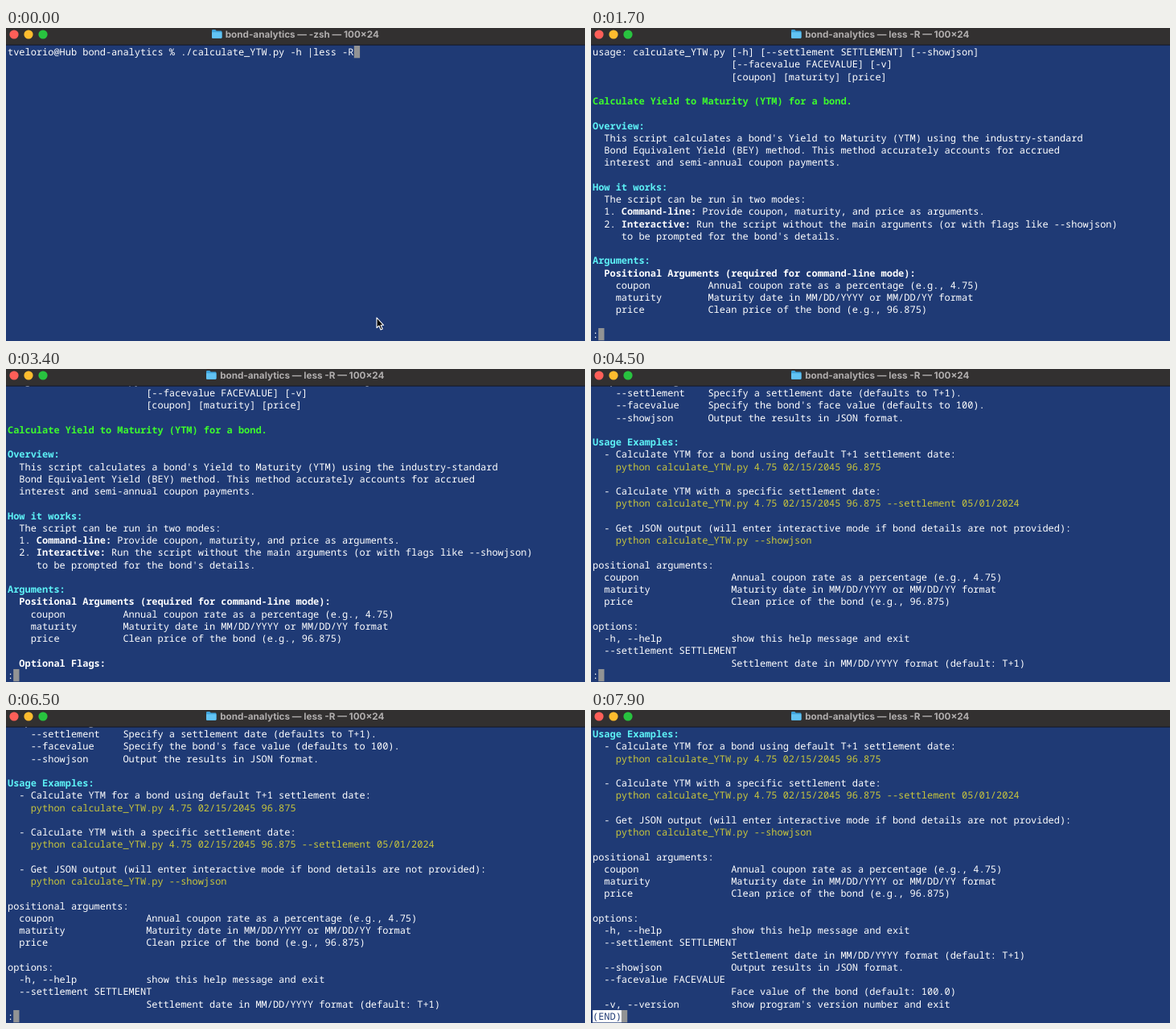
Animation of 720 by 389 pixels, one loop 8000 ms. Source, as an HTML page:

```html
<!DOCTYPE html>
<html lang="en">
<head>
<meta charset="utf-8">
<title>Terminal</title>
<style>
html, body { margin: 0; width: 100%; height: 100%; overflow: hidden; background: #1f3a75; }
svg { display: block; width: 100%; height: 100%; }
text { white-space: pre; text-rendering: geometricPrecision; }
.mono { font: 500 11.965px "Noto Sans Mono", "DejaVu Sans Mono", monospace; fill: #fff; }
.mono .b { font-weight: 700; }
.cyan { fill: #5df1f6; font-weight: 700; }
.green { fill: #3dfb2d; font-weight: 700; }
.yellow { fill: #c9c63c; }
#title { font: 700 11.7px Inter, "Open Sans", sans-serif; fill: #b1aeae; text-anchor: middle; }
</style>
</head>
<body>
<svg viewBox="0 0 720 389" preserveAspectRatio="none">
  <clipPath id="page"><rect y="21.5" width="720" height="351.5"/></clipPath>
  <rect width="720" height="389" fill="#1f3a75"/>
  <rect width="720" height="21" fill="#323030"/>
  <rect y="20.6" width="720" height="1" fill="#141722"/>
  <circle cx="10" cy="8" r="5.6" fill="#fe5f58"/>
  <circle cx="28" cy="8" r="5.6" fill="#febc2e"/>
  <circle cx="46" cy="8" r="5.6" fill="#28c33f"/>
  <g id="folder">
    <path d="M0 1.2Q0 0 1.2 0H4.2L5.8 1.5H11.3Q12.5 1.5 12.5 2.7V9.6Q12.5 10.8 11.3 10.8H1.2Q0 10.8 0 9.6Z" fill="#3fa4dc"/>
    <path d="M0 3.2H12.5V9.6Q12.5 10.8 11.3 10.8H1.2Q0 10.8 0 9.6Z" fill="#62c3f3"/>
  </g>
  <text id="title" x="368.3" y="12"></text>
  <g clip-path="url(#page)"><g id="doc" class="mono"></g></g>
  <text id="shell" class="mono" x="2" y="34"></text>
  <rect id="cursor" width="7.3" height="15.3" fill="#929394"/>
  <rect id="endBox" x="2" y="373" width="35.9" height="15.3" fill="#fff"/>
  <text id="status" class="mono" x="2" y="385"></text>
  <path id="pointer" d="M461 360V372.6L463.9 370L466 375L468.2 374L466.1 369.3H469.6Z" fill="#000" stroke="#fff" stroke-width="1.1" stroke-linejoin="round"/>
</svg>
<script>
const LOOP = 8000, TOP = 22, PITCH = 15.26, CELL = 7.18, LAST_ROW = 23;
const $ = id => document.getElementById(id);

const opt = (indent, col, name, info) => (" ".repeat(indent) + name).padEnd(col) + info;
const arg = (name, info) => opt(4, 20, name, info);
const item = (name, info) => opt(2, 24, name, info);
const params = row => [
  row("coupon", "Annual coupon rate as a percentage (e.g., 4.75)"),
  row("maturity", "Maturity date in MM/DD/YYYY or MM/DD/YY format"),
  row("price", "Clean price of the bond (e.g., 96.875)")
];

// Leading # ! $ sets a line colour; *text* is bold.
const lines = [
  "usage: calculate_YTW.py [-h] [--settlement SETTLEMENT] [--showjson]",
  item("", "[--facevalue FACEVALUE] [-v]"),
  item("", "[coupon] [maturity] [price]"),
  "",
  "!Calculate Yield to Maturity (YTM) for a bond.",
  "",
  "#Overview:",
  "  This script calculates a bond's Yield to Maturity (YTM) using the industry-standard",
  "  Bond Equivalent Yield (BEY) method. This method accurately accounts for accrued",
  "  interest and semi-annual coupon payments.",
  "",
  "#How it works:",
  "  The script can be run in two modes:",
  "  1. *Command-line:* Provide coupon, maturity, and price as arguments.",
  "  2. *Interactive:* Run the script without the main arguments (or with flags like --showjson)",
  "     to be prompted for the bond's details.",
  "",
  "#Arguments:",
  "  *Positional Arguments (required for command-line mode):*",
  ...params(arg),
  "",
  "  *Optional Flags:*",
  arg("--settlement", "Specify a settlement date (defaults to T+1)."),
  arg("--facevalue", "Specify the bond's face value (defaults to 100)."),
  arg("--showjson", "Output the results in JSON format."),
  "",
  "#Usage Examples:",
  "  - Calculate YTM for a bond using default T+1 settlement date:",
  "$    python calculate_YTW.py 4.75 02/15/2045 96.875",
  "",
  "  - Calculate YTM with a specific settlement date:",
  "$    python calculate_YTW.py 4.75 02/15/2045 96.875 --settlement 05/01/2024",
  "",
  "  - Get JSON output (will enter interactive mode if bond details are not provided):",
  "$    python calculate_YTW.py --showjson",
  "",
  "positional arguments:",
  ...params(item),
  "",
  "options:",
  item("-h, --help", "show this help message and exit"),
  "  --settlement SETTLEMENT",
  item("", "Settlement date in MM/DD/YYYY format (default: T+1)"),
  item("--showjson", "Output results in JSON format."),
  "  --facevalue FACEVALUE",
  item("", "Face value of the bond (default: 100.0)"),
  item("-v, --version", "show program's version number and exit")
];

const colours = { "#": "cyan", "!": "green", "$": "yellow" };
$("doc").innerHTML = lines.map((line, i) => {
  const cls = colours[line[0]] || "";
  const body = (cls ? line.slice(1) : line).split("*")
    .map((s, k) => k % 2 ? `<tspan class="b">${s}</tspan>` : s).join("");
  return `<text class="${cls}" x="2" y="${34 + i * PITCH}">${body}</text>`;
}).join("");

const command = "tvelorio@Hub bond-analytics % ./calculate_YTW.py -h |less -R";
$("shell").textContent = command;

// Each state holds from its time on; top is the first line on the page.
const pager = { job: "less -R", icon: 249, top: 0, status: ":" };
const states = [
  { at: 0, job: "-zsh", icon: 256, row: 0, col: command.length },
  { at: 500, job: "-zsh", icon: 256, row: 1, col: 0 },
  { at: 600, ...pager, job: "calculate_YTW.py -h", icon: 209, dim: true },
  { at: 1400, ...pager },
  { at: 3300, ...pager, top: 1 },
  { at: 4300, ...pager, top: 24 },
  { at: 7200, ...pager, top: 28, status: "(END)" }
];

const show = (id, on) => $(id).setAttribute("visibility", on ? "visible" : "hidden");
let shown = null;

function draw(t) {
  const s = states.filter(v => v.at <= t).pop();
  if (s === shown) return;
  shown = s;
  const paging = "status" in s, end = s.status === "(END)";
  const row = paging ? LAST_ROW : s.row;
  const col = paging ? s.status.length : s.col;
  $("title").textContent = `bond-analytics — ${s.job} — 100×24`;
  $("folder").setAttribute("transform", `translate(${s.icon} 2)`);
  $("folder").setAttribute("opacity", s.dim ? 0.55 : 1);
  $("doc").setAttribute("transform", `translate(0 ${-(s.top || 0) * PITCH})`);
  $("cursor").setAttribute("x", 2 + col * CELL);
  $("cursor").setAttribute("y", TOP + row * PITCH);
  $("status").textContent = s.status || "";
  $("status").style.fill = end ? "#1f3a75" : "#fff";
  show("doc", paging);
  show("shell", !paging);
  show("endBox", end);
  show("pointer", s.at === 0);
}

function tick() {
  draw(performance.now() % LOOP);
  requestAnimationFrame(tick);
}
tick();
</script>
</body>
</html>
```
